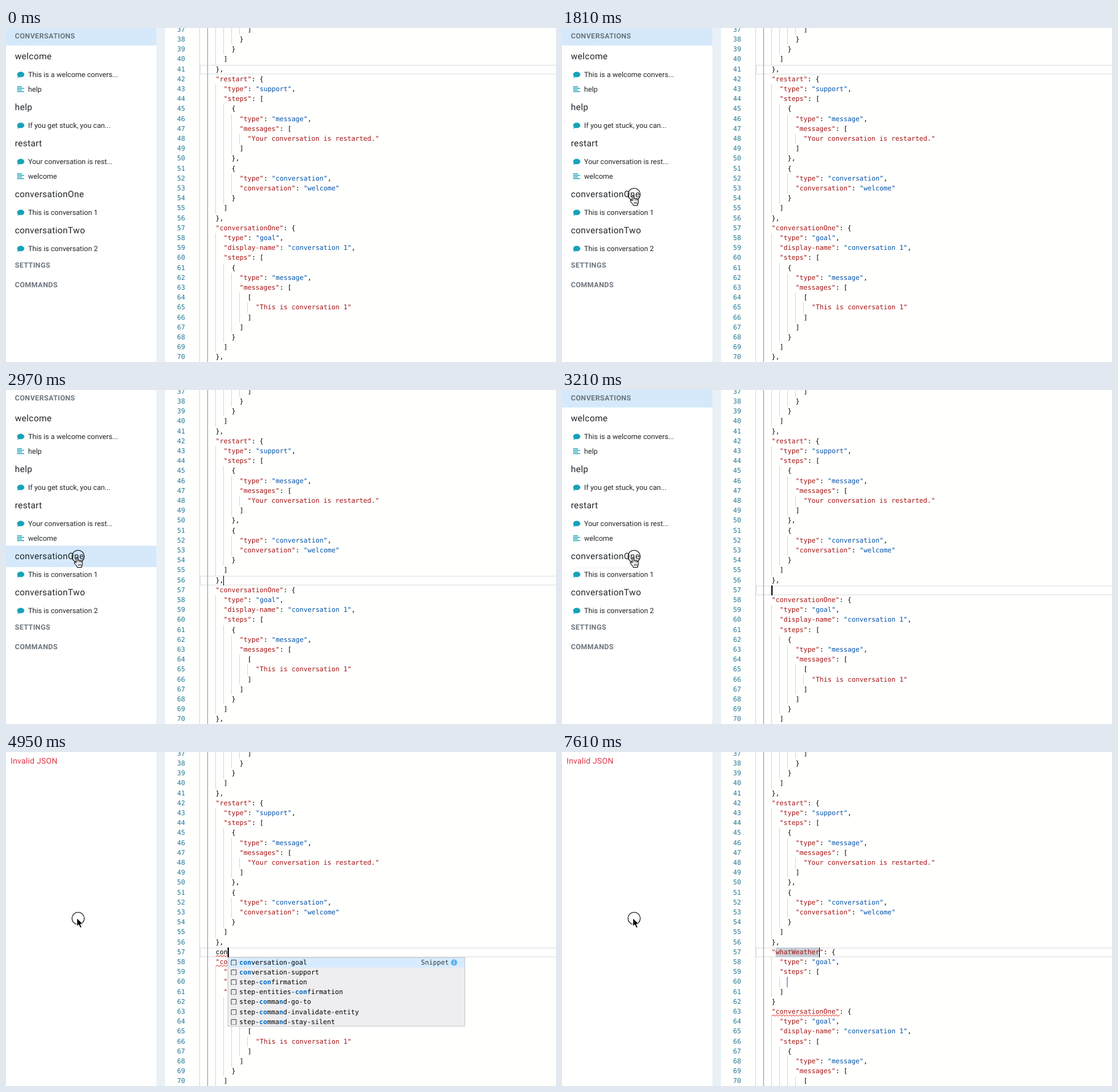
Animation of 896x545 px, one loop 8 s. Source, as an HTML page:

```html
<!DOCTYPE html>
<html lang="en">
<head>
<meta charset="utf-8">
<title>Conversation editor</title>
<style>
  html, body { margin: 0; width: 100%; height: 100%; overflow: hidden; background: #fff; }
  svg { display: block; width: 896px; height: 545px; }
  text { white-space: pre; text-rendering: geometricPrecision; }
  .code { font: 10.8px "DejaVu Sans Mono", "Liberation Mono", monospace; fill: #000; }
  .code .num { fill: #237893; }
  .key { fill: #a31515; }
  .val { fill: #0451a5; }
  .hit { fill: #0066bf; font-weight: bold; }
  .side { font: 11.7px Roboto, Inter, sans-serif; fill: #212529; }
  .title { font-size: 14.4px; letter-spacing: .3px; }
  .section { font-weight: bold; fill: #6c757d; letter-spacing: .3px; }
  .error { font-size: 13px; fill: #dc3545; letter-spacing: .2px; }
</style>
</head>
<body>
<svg id="stage" viewBox="0 0 896 545"></svg>
<script>
const LOOP = 8000, FIRST = 37, CHAR = 6.502, LEFT = 315.6, ROW = 16.2;

// Each code line is "indent|text".
const HEAD = `12|]
10|}
8|}
6|]
4|},
4|"restart": {
6|"type": "support",
6|"steps": [
8|{
10|"type": "message",
10|"messages": [
12|"Your conversation is restarted."
10|]
8|},
8|{
10|"type": "conversation",
10|"conversation": "welcome"
8|}
6|]
4|},`.split('\n');
const TAIL = `4|"conversationOne": {
6|"type": "goal",
6|"display-name": "conversation 1",
6|"steps": [
8|{
10|"type": "message",
10|"messages": [
12|[
14|"This is conversation 1"
12|]
10|]
8|}
6|]
4|},`.split('\n');
const SNIPPET = ['6|"type": "goal",', '6|"steps": [', '8|', '6|]', '4|}'];

const OPTIONS = ['[con]versation-goal', '[con]versation-support', 'step-[con]firmation',
  'step-entities-[con]firmation', 'step-[co]mma[n]d-go-to',
  'step-[co]mma[n]d-invalidate-entity', 'step-[co]mma[n]d-stay-silent'];

const MENU = [['title', 46, 'welcome'], ['chat', 76, 'This is a welcome convers...'], ['bars', 100, 'help'],
  ['title', 129, 'help'], ['chat', 159, 'If you get stuck, you can...'],
  ['title', 188, 'restart'], ['chat', 218, 'Your conversation is rest...'], ['bars', 242, 'welcome'],
  ['title', 271, 'conversationOne'], ['chat', 301, 'This is conversation 1'],
  ['title', 330, 'conversationTwo'], ['chat', 360, 'This is conversation 2'],
  ['section', 387, 'SETTINGS'], ['section', 419, 'COMMANDS']];

// typed: plain text on the new line; name: key of the inserted snippet
const START = { line: 41, caret: null, thick: 1, braces: false, nav: 'head', ghost: false,
  typed: null, name: null, picked: false, rows: 0, marks: [], at: null, shape: 'arrow' };

const move = (t, x, y, shape = 'arrow') => [t, { at: [x, y], shape }];
const type = (t, name) => [t, { name, caret: [57, 5 + name.length] }];
const STEPS = [
  move(590, 179, 500), move(680, 90, 350), move(770, 95, 301),
  move(950, 95.5, 296), move(1010, 96.5, 289), move(1070, 98, 281),
  move(1130, 100.5, 273.5), move(1190, 102, 269),
  move(1390, 170, 215), move(1450, 290, 112, 'beam'), move(1510, 344, 71, 'beam'),
  move(1750, 205, 193), move(1810, 117.5, 271.5, 'hand'),
  [2170, { line: 57, caret: [57, 23] }],
  [2230, { braces: true }],
  [2440, { nav: 'item' }],
  [2670, { caret: null }],
  [2910, { line: 56, caret: [56, 6] }],
  [2970, { braces: false }],
  [3150, { line: 57, caret: [57, 4], thick: 2, typed: '' }],
  [3210, { nav: 'head', ghost: true }],
  [3720, { typed: 'co', caret: [57, 6] }],
  [3840, { typed: 'con', caret: [57, 7], rows: 9 }],
  [3900, { rows: 7 }],
  [4410, { caret: null, marks: [[57, 3], [58, 17]] }],
  [4830, { nav: 'error', ghost: false }],
  [4890, { caret: [57, 7] }],
  move(4950, 117.5, 271.5),
  [5360, { typed: null, name: 'conversationName', picked: true, rows: 0, line: 0,
    caret: [57, 21], thick: 1, marks: [[57, 18], [63, 17]] }],
  [5840, { caret: null, marks: [[63, 17]] }],
  [6050, { name: 'w', picked: false, line: 57, caret: [57, 6] }],
  type(6110, 'wh'), type(6250, 'wha'), type(6370, 'what'), type(6670, 'whatW'),
  type(6970, 'whatWe'), type(7080, 'whatWea'), type(7200, 'whatWeat'),
  type(7440, 'whatWeath'), type(7520, 'whatWeathe'), type(7610, 'whatWeather')
];

const rowY = n => Math.floor(60.05 + (n - 41) * ROW);
const base = n => rowY(n) + 11;
const colX = c => LEFT + c * CHAR;
const rect = (x, y, w, h, fill, more = '') =>
  `<rect x="${x}" y="${y}" width="${w}" height="${h}" fill="${fill}" ${more}/>`;
const text = (x, y, cls, s) => `<text x="${x}" y="${y}" class="${cls}">${s}</text>`;
const span = (cls, s) => `<tspan class="${cls}">${s}</tspan>`;

const paint = s => s.replace(/(: )?("[^"]*")/g, (_, colon = '', str) =>
  colon + span(colon ? 'val' : 'key', str));

function icon(kind, y) {
  if (kind === 'bars') {
    return [8, 11.5, 8, 11.5].map((w, i) => rect(18, y - 4.8 + i * 2.6, w, 1.4, '#17a2b8')).join('');
  }
  return `<path fill="#17a2b8" d="M24 ${y - 4.5}c3.3 0 5.8 2 5.8 4.4s-2.5 4.4-5.8 4.4c-.9 0-1.7-.1-2.4-.4
    -.9.7-2 1.1-3.3 1.1.6-.7 1-1.4 1.1-2.1-.8-.8-1.2-1.8-1.2-3 0-2.4 2.5-4.4 5.8-4.4z"/>`;
}

function sidebar(s) {
  if (s.nav === 'error') return text(7.5, 19, 'side error', 'Invalid JSON');
  let out = s.nav === 'head' ? rect(0, 0, 245, 28.5, '#d5e9fb') : rect(0, 254, 245, 35, '#d5e9fb');
  if (s.ghost) out += rect(15, 290, 93, 1, '#f3f3f3');
  out += text(14.5, 17, 'side section', 'CONVERSATIONS');
  for (const [kind, y, label] of MENU) {
    if (kind === 'title') out += text(14.5, y + 5, 'side title', label);
    else if (kind === 'section') out += text(14.5, y + 4, 'side section', label);
    else out += icon(kind, y) + text(36, y + 4, 'side', label);
  }
  return out;
}

function squiggle([n, len]) {
  const x = colX(4), y = rowY(n) + 15;
  let d = `M${x} ${y}`;
  for (let i = 1; i * 2.7 <= len * CHAR + 1; i++) d += `L${x + i * 2.7} ${y - (i % 2) * 2.2}`;
  return `<path d="${d}" fill="none" stroke="#e51400" stroke-width=".9"/>`;
}

function editor(s) {
  let mid = [];
  if (s.typed !== null) mid = ['4|' + s.typed];
  if (s.name !== null) mid = [`4|"${s.name}": {`, ...SNIPPET];
  const lines = [...HEAD, ...mid, ...TAIL].slice(0, 34);
  let out = rect(245, 0, 14, 545, '#e9f0f6') + rect(259, 0, 637, 545, '#fffffe');

  if (s.line) {
    out += rect(316.5, rowY(s.line) + .75, 600, 14.5, 'none', 'stroke="#e6e6e6" stroke-width="1.4"');
  }
  if (s.name !== null) {
    out += rect(colX(5), rowY(57), s.name.length * CHAR, 16, s.picked ? '#add6ff' : '#c9cfd6');
    out += rect(366, rowY(60), 1.8, 17, '#8b9fb8');
  }
  if (s.braces) {
    for (const [n, c] of [[57, 23], [70, 4]]) {
      out += rect(colX(c), rowY(n) + .5, CHAR, 15, 'rgba(0,100,0,.1)', 'stroke="#b9b9b9" stroke-width=".9"');
    }
  }
  lines.forEach((line, i) => {
    const n = FIRST + i, [indent, code] = line.split('|');
    for (let c = 0; c < indent; c += 2) {
      out += rect(Math.floor(colX(c)), rowY(n), 1, rowY(n + 1) - rowY(n), c === 2 && s.line ? '#939393' : '#d6d6d6');
    }
    out += text(278.7, base(n), 'num', n);
    if (code) out += text(colX(+indent), base(n), '', paint(code));
  });
  out += s.marks.map(squiggle).join('');
  if (s.caret) out += rect(Math.floor(colX(s.caret[1])), rowY(s.caret[0]), s.thick, 16, '#000');
  return `<g class="code">${out}</g>`;
}

function popup(rows) {
  if (!rows) return '';
  let out = rect(361.5, 335.5, 386, rows * ROW - 1.5, '#eeeef0', 'stroke="#c8c8c8"')
    + rect(362, 336, 385, 15.5, '#d6ebff');
  OPTIONS.forEach((label, i) => {
    const y = Math.floor(343.05 + i * ROW);
    out += `<path d="M367 ${y + 4.5}V${y - 3.5}H375V${y + 4.5}" fill="none" stroke="#424242"/>
      <path d="M367 ${y + 4.5}H376" stroke="#424242" stroke-dasharray="1.5 1.5"/>`;
    out += text(380, y + 4, '', label.replace(/\[(\w+)\]/g, (_, m) => span('hit', m)));
  });
  out += `<g fill-opacity=".75">${text(676, 347, '', 'Snippet')}</g>
    <circle cx="730" cy="343.5" r="5" fill="#56b0e6"/>`
    + rect(729.3, 342.6, 1.4, 3.8, '#fff') + rect(729.3, 340.3, 1.4, 1.4, '#fff');
  return `<g class="code">${out}</g>`;
}

const SHAPES = {
  arrow: `<path d="M-2-.5V13L1.1 10.3 3.3 15.6 5.9 14.5 3.7 9.4H8Z" fill="#000" stroke="#fff" stroke-width="1"/>`,
  beam: `<path d="M-2.5-7Q0-7 0-5V5Q0 7-2.5 7M2.5-7Q0-7 0-5M2.5 7Q0 7 0 5" fill="none" stroke="#000" stroke-width="1.1"/>`,
  hand: `<path d="M-3.2 9V3.4C-3.2 1.4-.6 1.4-.6 3.4V7C-.4 5.6 1.8 5.7 2 7.2 2.4 6 4.3 6.3 4.5 7.8
    5 6.9 6.8 7.3 6.8 9V12.5C6.8 14.6 5.6 15.6 5.4 18H-1.2C-1.6 15.8-4 14-5.8 11.3-6.9 9.4-4.8 8.2-3.2 10Z"
    fill="#fff" stroke="#000" stroke-width="1.1"/>
    <path d="M-.6 7V10M2 7.4V10M4.5 8V10.5M.3 12.2V15.5M2.3 12.2V15.5M4.3 12.2V15.5" stroke="#000" stroke-width=".8"/>`
};

function pointer({ at, shape }) {
  if (!at) return '';
  return `<g transform="translate(${at})"><circle r="10" fill="none" stroke="#000" stroke-width="1.1"/>${SHAPES[shape]}</g>`;
}

const stage = document.getElementById('stage');
let shown = -1;

function draw() {
  const t = performance.now() % LOOP;
  const past = STEPS.filter(([at]) => at <= t);
  if (past.length !== shown) {
    shown = past.length;
    const s = Object.assign({}, START, ...past.map(p => p[1]));
    stage.innerHTML = rect(0, 0, 896, 545, '#fff') + sidebar(s) + editor(s) + popup(s.rows) + pointer(s);
  }
  requestAnimationFrame(draw);
}
draw();
</script>
</body>
</html>
```
